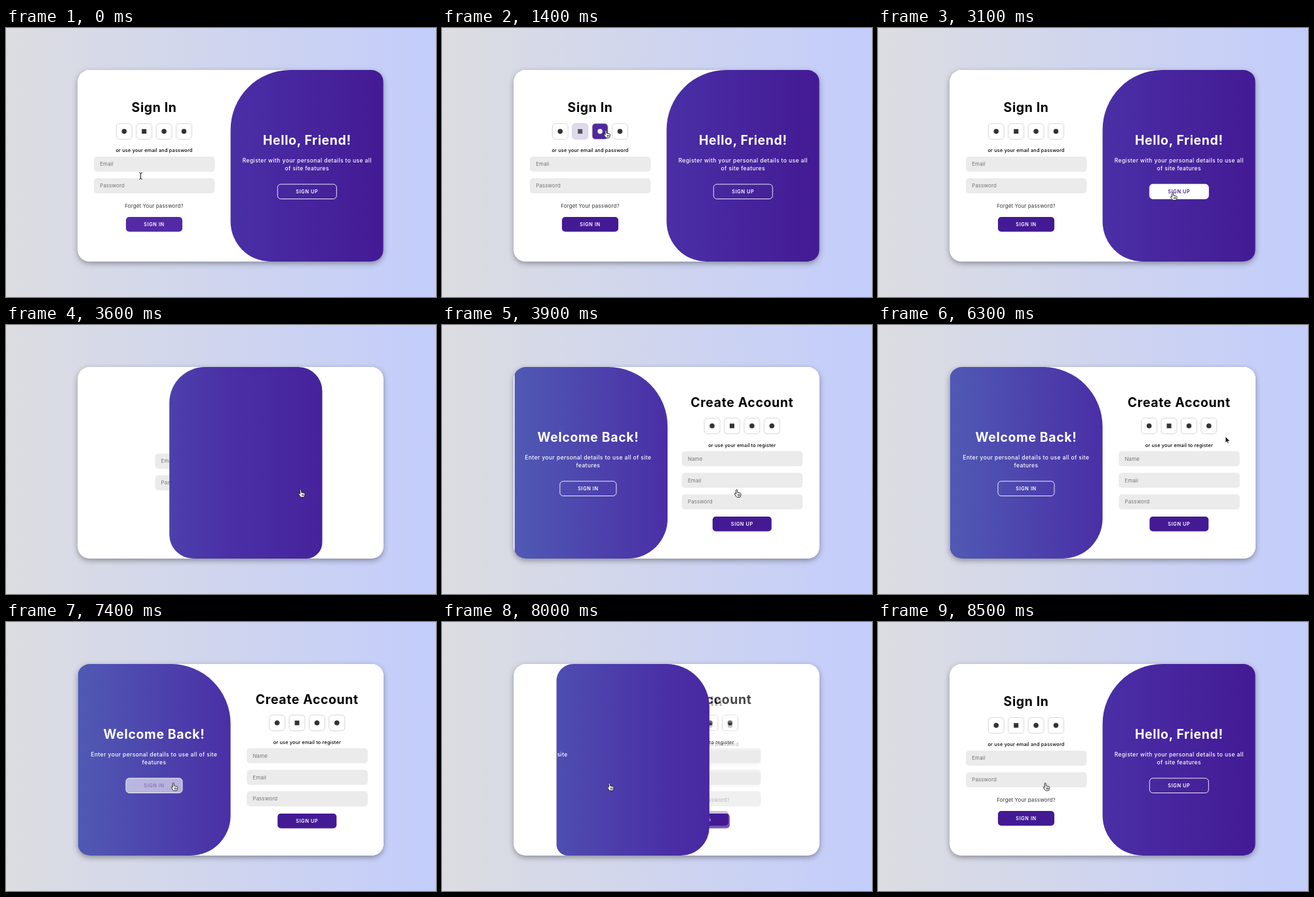
An HTML page for the animation above (9200 ms loop, 656 by 410 pixels).

```html
<!DOCTYPE html>
<html lang="en">
<head>
<meta charset="utf-8">
<title>Sign in and sign up</title>
<style>
  html, body { margin: 0; width: 100%; height: 100%; overflow: hidden; }
  body { background: linear-gradient(to right, #dcdde1, #c3cdfb); }
  svg { display: block; width: 656px; height: 410px; --accent: #431a94; --h: 0; }
  text { font: 500 7.3px Inter, "Open Sans", sans-serif; letter-spacing: .2px; text-anchor: middle; }
  .title { font-size: 19.4px; font-weight: 700; letter-spacing: .65px; }
  .lead { font-size: 8.5px; letter-spacing: .4px; }
  .link { font-size: 7.9px; font-weight: 400; letter-spacing: .17px; fill: #333; }
  .hint { font-size: 7.9px; font-weight: 400; letter-spacing: .15px; text-anchor: start; fill: #757575; }
  .label { font-weight: 600; letter-spacing: .6px; fill: #fff; }
  .field { fill: #ebebeb; }
  .solid { fill: var(--accent); }
  .panel text { fill: #fff; }
  .ghost rect { fill: rgb(255 255 255 / var(--h)); stroke: #fff; stroke-width: .9; }
  .ghost .label { fill: color-mix(in srgb, var(--accent) calc(var(--h) * 100%), #fff); }
  .icon .box { fill: color-mix(in srgb, var(--accent) calc(var(--h) * 100%), #fff); stroke: #ccc; stroke-width: .8; }
  .icon .mark { fill: color-mix(in srgb, #fff calc(var(--h) * 100%), #333); }
  #card { filter: drop-shadow(0 3px 4.5px rgb(0 0 0 / .35)); }
  #cursor path { stroke-linejoin: round; stroke-linecap: round; }
</style>
</head>
<body>
<svg viewBox="0 0 656 410">
  <defs>
    <linearGradient id="purple">
      <stop offset="0" stop-color="#505ab4"/>
      <stop offset=".5" stop-color="#4a2fa6"/>
      <stop offset="1" stop-color="#431a94"/>
    </linearGradient>
    <clipPath id="cardClip"><rect x="109.3" y="64" width="466.6" height="292" rx="18.2"/></clipPath>
    <clipPath id="panelClip"><path id="panelShape"/></clipPath>
  </defs>
  <rect id="card" x="109.3" y="64" width="466.6" height="292" rx="18.2" fill="#fff"/>
  <g clip-path="url(#cardClip)">
    <g id="forms"><g id="signUp"></g><g id="signIn"></g></g>
    <g class="panel" clip-path="url(#panelClip)">
      <rect x="109.3" y="64" width="466.6" height="292" fill="url(#purple)"/>
      <g id="welcome"></g>
      <g id="hello"></g>
    </g>
  </g>
  <g id="cursor">
    <path id="hand" fill="#fff" stroke="#111" stroke-width=".9" d="M-1.1 1a1.1 1.1 0 0 1 2.2 0V4.2l4 .8q1.5.4 1.4 1.9l-.6 3.2q-.3 1.4-1.4 1.4H.9q-.8 0-1.4-.9L-3 7.1q-.5-1 .3-1.4.8-.2 1.6.7zM2.3 7v2.4M4.1 7v2.4"/>
    <g id="beam" fill="none">
      <path stroke="#fff" stroke-width="2" d="M-2-5Q0-5 0-3.6V3.6Q0 5-2 5M2-5Q0-5 0-3.6M0 3.6Q0 5 2 5"/>
      <path stroke="#111" d="M-2-5Q0-5 0-3.6V3.6Q0 5-2 5M2-5Q0-5 0-3.6M0 3.6Q0 5 2 5"/>
    </g>
    <path id="arrow" fill="#111" stroke="#fff" stroke-width=".8" d="M0 0V9.6L2.2 7.6 3.7 11 5.2 10.3 3.8 7.1H6.8z"/>
  </g>
</svg>
<script>
const LOOP = 9200, STEP = 100, SLIDE = 600, FADE = 300;
const HALF = 233.3, LEFT = 109.3, TOP = 64, BOTTOM = 356, CENTER = 226;
const TO_SIGN_UP = 3335, TO_SIGN_IN = 7780;
const $ = id => document.getElementById(id);

const text = (cls, x, y, str) => `<text class="${cls}" x="${x}" y="${y}">${str}</text>`;
const field = (y, str) =>
  `<rect class="field" x="134" y="${y}" width="184.5" height="23" rx="5"/>` + text('hint', 143.2, y + 14.4, str);
const button = (cls, x, y, w, str) =>
  `<g class="${cls}"><rect x="${x - w / 2}" y="${y}" width="${w}" height="22.4" rx="5"/>${text('label', x, y + 13.8, str)}</g>`;
const icons = y => [0, 1, 2, 3].map(i => {
  const x = 180.3 + i * 30.4;
  const mark = i === 1
    ? `<rect class="mark" x="${x - 3.5}" y="${y - 3.5}" width="7" height="7"/>`
    : `<circle class="mark" cx="${x}" cy="${y}" r="3.8"/>`;
  return `<g class="icon"><rect class="box" x="${x - 12}" y="${y - 12}" width="24" height="24" rx="4.9"/>${mark}</g>`;
}).join('');
const backdrop = `<rect x="${LEFT}" y="${TOP}" width="${HALF}" height="292" fill="#fff"/>`;
const message = (x, title, line1, line2, label, w) =>
  text('title', x, 178, title) + text('lead', x, 204.5, line1) + text('lead', x, 216.6, line2) +
  button('ghost', x, 238.1, w, label);

$('signIn').innerHTML = backdrop + text('title', CENTER, 128.2, 'Sign In') + icons(157.6) +
  text('', CENTER, 189, 'or use your email and password') + field(196, 'Email') + field(229, 'Password') +
  text('link', CENTER, 273.8, 'Forget Your password?') + button('solid', CENTER, 288, 86, 'SIGN IN');
$('signUp').innerHTML = backdrop + text('title', CENTER, 124.8, 'Create Account') + icons(153.8) +
  text('', CENTER, 185.5, 'or use your email to register') + field(192.2, 'Name') + field(225.2, 'Email') +
  field(258, 'Password') + button('solid', CENTER, 292, 90, 'SIGN UP');
$('welcome').innerHTML = message(CENTER, 'Welcome Back!',
  'Enter your personal details to use all of site', 'features', 'SIGN IN', 86);
$('hello').innerHTML = message(CENTER + HALF, 'Hello, Friend!',
  'Register with your personal details to use all', 'of site features', 'SIGN UP', 90);

const inIcons = $('signIn').querySelectorAll('.icon'), upIcons = $('signUp').querySelectorAll('.icon');
// Element, pointer enters, pointer leaves
const hovers = [
  [inIcons[0], 600, 950], [inIcons[1], 950, 1150], [inIcons[2], 1120, 1440], [inIcons[3], 1440, 1550],
  [$('hello').querySelector('.ghost'), 2650, 3450],
  [upIcons[0], 4850, 5020], [upIcons[1], 5020, 5390], [upIcons[2], 5390, 5650], [upIcons[3], 5650, 5900],
  [$('welcome').querySelector('.ghost'), 7220, 7880],
];
// Time, x, y, shape
const track = [
  [0, 205.5, 225.5, 'beam'], [499, 205.5, 225.5, 'beam'], [500, 186, 189, 'beam'], [600, 186, 189, 'beam'],
  [700, 180, 160, 'hand'], [1000, 207, 157, 'hand'], [1200, 237, 156, 'hand'], [1400, 250, 156, 'hand'],
  [1500, 271, 158, 'hand'], [1600, 380, 199, 'beam'], [2100, 380, 199, 'beam'], [2300, 395, 221, 'arrow'],
  [2600, 430, 242, 'hand'], [2900, 449.5, 251, 'hand'], [4200, 449.5, 251, 'hand'], [4300, 446, 240, 'beam'],
  [4600, 425, 205, 'beam'], [4800, 412, 176, 'arrow'], [4900, 411, 158, 'hand'], [5200, 442, 155, 'hand'],
  [5400, 462.5, 154, 'hand'], [5800, 502, 156, 'hand'], [6000, 526, 157, 'arrow'], [6200, 535, 155, 'arrow'],
  [6500, 520, 200, 'beam'], [6900, 430, 236, 'beam'], [7000, 355, 242, 'arrow'], [7200, 259, 247, 'hand'],
  [7300, 255.3, 245.5, 'hand'], [LOOP, 255.3, 245.5, 'hand'],
];

const clamp = v => Math.min(1, Math.max(0, v));

// cubic-bezier(.42, 0, .58, 1)
function easeInOut(x) {
  let lo = 0, hi = 1;
  for (let i = 0; i < 24; i++) {
    const s = (lo + hi) / 2, r = 1 - s;
    if (1.26 * r * r * s + 1.74 * r * s * s + s ** 3 < x) lo = s; else hi = s;
  }
  return lo * lo * (3 - 2 * lo);
}

const shift = (id, dx) => $(id).setAttribute('transform', `translate(${dx} 0)`);

function drawSlide(t) {
  const back = t >= TO_SIGN_IN;
  const time = clamp((t - (back ? TO_SIGN_IN : TO_SIGN_UP)) / SLIDE);
  const e = easeInOut(time), p = back ? 1 - e : e;
  const x = LEFT + HALF * (1 - p), r = x + HALF;
  const tl = 91 * (1 - p), tr = 91 * p, br = 61 * p, bl = 61 * (1 - p);
  $('panelShape').setAttribute('d',
    `M${x + tl} ${TOP}H${r - tr}A${tr} ${tr} 0 0 1 ${r} ${TOP + tr}V${BOTTOM - br}` +
    `A${br} ${br} 0 0 1 ${r - br} ${BOTTOM}H${x + bl}A${bl} ${bl} 0 0 1 ${x} ${BOTTOM - bl}` +
    `V${TOP + tl}A${tl} ${tl} 0 0 1 ${x + tl} ${TOP}Z`);
  shift('signIn', HALF * p);
  shift('signUp', HALF * p);
  shift('welcome', -2 * HALF * (1 - p));
  shift('hello', 2 * HALF * p);
  $('signUp').style.opacity = back ? p : time >= .5 ? 1 : 0;
  const upper = $(back ? (p > .375 ? 'signUp' : 'signIn') : time >= .5 ? 'signUp' : 'signIn');
  if ($('forms').lastChild !== upper) $('forms').append(upper);
}

function drawCursor(t) {
  let i = track.findLastIndex(k => k[0] <= t);
  const a = track[i], b = track[i + 1], f = (t - a[0]) / (b[0] - a[0]);
  const x = a[1] + (b[1] - a[1]) * f, y = a[2] + (b[2] - a[2]) * f;
  $('cursor').setAttribute('transform', `translate(${x} ${y})`);
  for (const shape of ['hand', 'beam', 'arrow']) $(shape).style.display = shape === a[3] ? '' : 'none';
}

function frame() {
  const t = Math.floor(performance.now() % LOOP / STEP) * STEP;
  drawSlide(t);
  drawCursor(t);
  for (const [el, enter, leave] of hovers)
    el.style.setProperty('--h', clamp((t - enter) / FADE) * (1 - clamp((t - leave) / FADE)));
  $('signIn').style.setProperty('--accent', t < 100 ? '#5329a6' : t < 500 ? '#4b229d' : '#431a94');
  requestAnimationFrame(frame);
}
frame();
</script>
</body>
</html>
```
